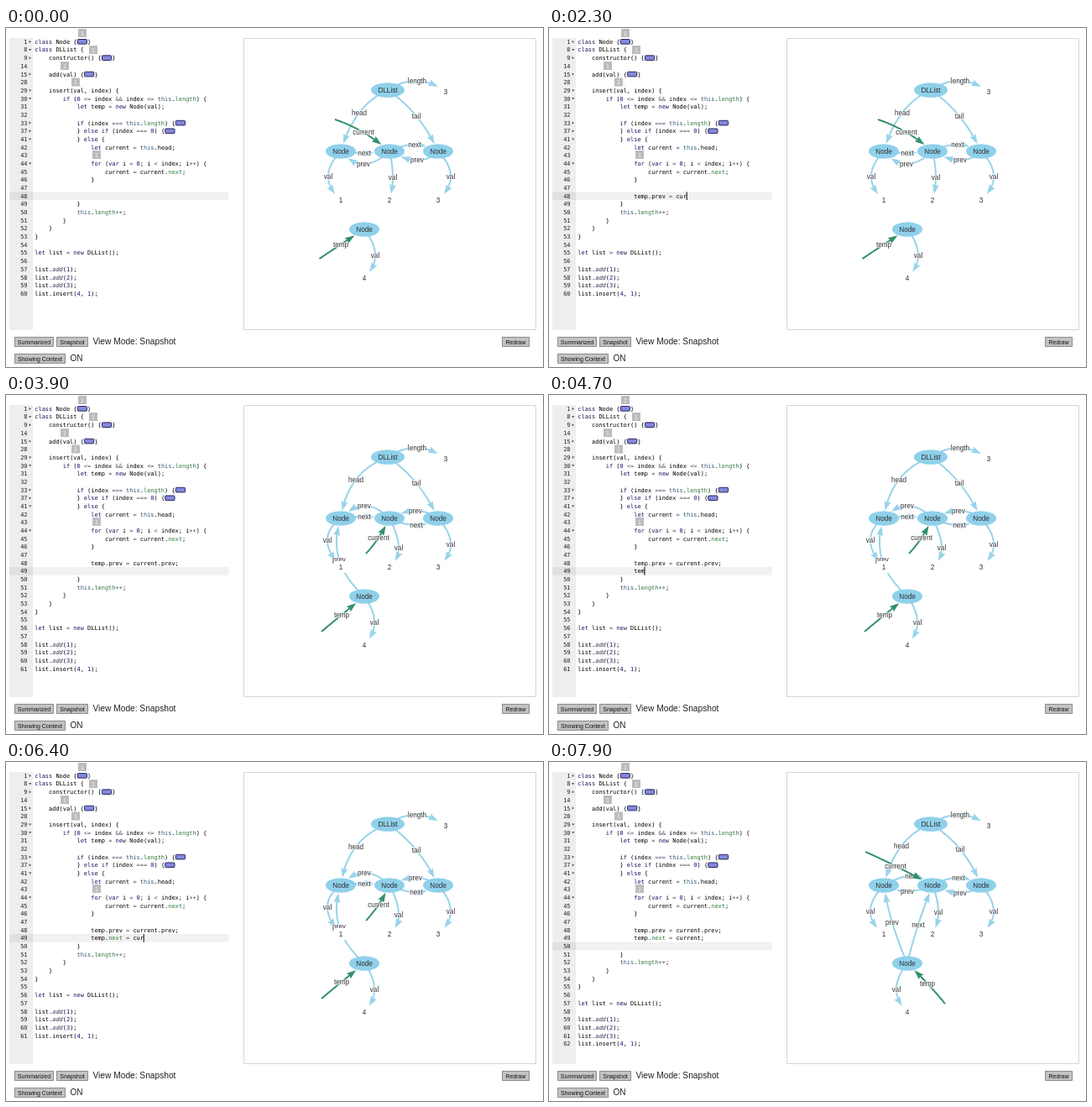
Animation, 640 px wide and 404 px high, one loop 8000 ms. Source, as an HTML page with a canvas:

```html
<!DOCTYPE html>
<html lang="en">
<head>
<meta charset="utf-8">
<title>Linked list editor</title>
<style>
html, body { margin: 0; width: 100%; height: 100%; overflow: hidden; background: #fff; }
canvas { display: block; width: 640px; height: 404px; }
</style>
</head>
<body>
<canvas id="stage"></canvas>
<script>
const LOOP = 8000, W = 640, H = 404;
const canvas = document.getElementById('stage');
const scale = Math.max(1, window.devicePixelRatio || 1);
canvas.width = W * scale;
canvas.height = H * scale;
const ctx = canvas.getContext('2d');

const MONO = '6.95px "DejaVu Sans Mono", monospace';
const SANS = '"Liberation Sans", Arial, sans-serif';
const CHAR = 4.183, ROW = 9.68, LEFT = 34.3, TOP = 16.3;
const SKY = '#8fd0ea', EDGE = '#98d3ea', GREEN = '#32906a';

// Each row: line number, gutter marker, code ("@" is a folded block).
const head = [
  [1, '>', 'class Node {@}'],
  [8, 'v', 'class DLList {'],
  [9, '>', '    constructor() {@}'],
  [14, '', ''],
  [15, '>', '    add(val) {@}'],
  [28, '', ''],
  [29, 'v', '    insert(val, index) {'],
  [30, 'v', '        if (0 <= index && index <= this.length) {'],
  [31, '', '            let temp = new Node(val);'],
  [32, '', ''],
  [33, '>', '            if (index === this.length) {@'],
  [37, '>', '            } else if (index === 0) {@'],
  [41, 'v', '            } else {'],
  [42, '', '                let current = this.head;'],
  [43, '', ''],
  [44, 'v', '                for (var i = 0; i < index; i++) {'],
  [45, '', '                    current = current.next;'],
  [46, '', '                }'],
  [47, '', '']
];
const tail = [
  '            }', '            this.length++;', '        }', '    }', '}', '',
  'let list = new DLList();', '',
  'list.add(1);', 'list.add(2);', 'list.add(3);', 'list.insert(4, 1);'
];
const badges = [[91, 6], [104, 26], [70, 45], [83, 64.5], [108, 151]];

// Typed lines: text, [time, characters] keys, time of the Enter key.
const typed = [
  { text: 'temp.prev = current.prev;', keys: [[450, 0], [1440, 9], [2250, 15], [3050, 22], [3400, 25]], enter: 3900 },
  { text: 'temp.next = current;', keys: [[4270, 0], [4640, 3], [6340, 15], [6950, 20]], enter: 7150 }
];

const nodes = {
  D: [455, 74, 'DLList', 20], A: [399, 147, 'Node', 18], B: [457, 147, 'Node', 18],
  C: [515, 147, 'Node', 18], T: [427, 240, 'Node', 18],
  len: [524, 76, '3'], v1: [399, 205, '1'], v2: [457, 205, '2'], v3: [515, 205, '3'], v4: [427, 298, '4']
};

// Edge: from, to, label, label position. Pointer: start, node, label, label position.
const scenes = [
  {
    at: 0,
    edges: `D len length 490 63;D A head 421 101;D C tail 489 105;A B next 427 149;B A prev 426 162;
      B C next 487 139;C B prev 490 157.5;A v1 val 384 177;B v2 val 461 178;C v3 val 530 177;T v4 val 440 271`,
    pointers: [[392, 109, 'B', 'current', 426, 124.5], [373.5, 275, 'T', 'temp', 399, 258]]
  },
  {
    at: 3900,
    edges: `D len length 490 63;D A head 417 101;D C tail 489 105;B A prev 427 132;A B next 427 145;
      C B prev 488 138;B C next 489 155;A v1 val 383 173;B v2 val 468 182;C v3 val 530 178;
      T A prev 397 196;T v4 val 439 271`,
    pointers: [[429, 189, 'B', 'current', 444, 170], [376, 282, 'T', 'temp', 400, 262]]
  },
  {
    at: 7180,
    edges: `D len length 490 63;D A head 420 100;D C tail 490 104;A B next 432 136;B A prev 427 154;
      B C next 488 138;C B prev 490 156;A v1 val 383 178;B v2 val 464 179;C v3 val 530 178;
      T A prev 409 191;T B next 440 194;T v4 val 414 271`,
    pointers: [[377, 107, 'B', 'current', 413, 124], [472, 288, 'T', 'temp', 451, 264]]
  }
];
for (const s of scenes) {
  s.edges = s.edges.split(';').map(e => {
    const [from, to, name, x, y] = e.trim().split(/\s+/);
    return { from, to, name, x: +x, y: +y };
  });
}

function text(str, x, y, color, font, align = 'left') {
  ctx.font = font;
  ctx.textAlign = align;
  ctx.textBaseline = 'alphabetic';
  ctx.fillStyle = color;
  ctx.fillText(str, x, y);
}

function box(x, y, w, h, fill, stroke) {
  ctx.fillStyle = fill;
  ctx.fillRect(x, y, w, h);
  if (!stroke) return;
  ctx.strokeStyle = stroke;
  ctx.lineWidth = 1;
  ctx.strokeRect(x + 0.5, y + 0.5, w - 1, h - 1);
}

function tokenColor(tok) {
  if (/^(class|let|var|new|if|else|for)$/.test(tok)) return '#14145c';
  if (/^(length|next)$/.test(tok)) return '#2c7a3a';
  if (tok === 'this') return '#2c5a74';
  if (/^\d+$/.test(tok)) return '#14147c';
  if (/^[=<&+]+$/.test(tok)) return '#485060';
  return '#000';
}

function pill(x, y) {
  ctx.beginPath();
  ctx.roundRect(x + 0.7, y - 2.8, 11.2, 5.6, 1);
  ctx.fillStyle = '#8488dc';
  ctx.fill();
  ctx.strokeStyle = '#26265c';
  ctx.lineWidth = 1;
  ctx.stroke();
}

function codeLine(str, y) {
  let x = LEFT, last = '';
  for (const tok of str.match(/\s+|\w+|[=<&+]+|./g) || []) {
    if (tok === '@') {
      pill(x, y);
      x += 3 * CHAR;
    } else {
      const call = last === '.' && tok === 'add';
      if (call) text(tok, x, y + 2.5, '#26324e', 'italic ' + MONO);
      else if (tok.trim()) text(tok, x, y + 2.5, tokenColor(tok), MONO);
      x += tok.length * CHAR;
    }
    last = tok;
  }
}

function marker(kind, y) {
  ctx.fillStyle = '#555';
  ctx.beginPath();
  if (kind === '>') {
    ctx.moveTo(27.6, y - 1.6); ctx.lineTo(30, y); ctx.lineTo(27.6, y + 1.6);
  } else {
    ctx.moveTo(27, y - 1); ctx.lineTo(30.4, y - 1); ctx.lineTo(28.7, y + 1.3);
  }
  ctx.fill();
}

function countAt(keys, t) {
  if (t < keys[0][0]) return 0;
  for (let i = 1; i < keys.length; i++) {
    const [t0, n0] = keys[i - 1], [t1, n1] = keys[i];
    if (t < t1) return Math.floor(n0 + (n1 - n0) * (t - t0) / (t1 - t0));
  }
  return keys[keys.length - 1][1];
}

function caretOn(t, line) {
  if (t < 300) return false;
  const start = line ? line.keys[0][0] : typed[1].enter;
  const end = line ? line.keys[line.keys.length - 1][0] : start;
  if (t >= start && t <= end) return true;
  const since = t > end ? t - end : t;
  return since % 1000 < 500;
}

function editor(t) {
  const done = typed.filter(l => t >= l.enter).length;
  const line = typed[done];
  const count = line ? countAt(line.keys, t) : 0;
  const pad = ' '.repeat(16);
  const rows = head.slice();
  let n = 48;
  for (let i = 0; i < done; i++) rows.push([n++, '', pad + typed[i].text]);
  const active = rows.length;
  rows.push([n++, '', pad + (line ? line.text.slice(0, count) : '')]);
  for (const str of tail) rows.push([n++, '', str]);

  const ay = TOP + active * ROW - 4.9;
  box(4, 12, 28, 348, '#eeeeee');
  box(4, ay, 28, ROW, '#e0e0e0');
  box(32, ay, 233.5, ROW, '#f1f1f1');
  rows.forEach(([num, mark, str], i) => {
    const y = TOP + i * ROW;
    text(num, 25.5, y + 2.5, '#222', MONO, 'right');
    if (mark) marker(mark, y);
    codeLine(str, y);
  });
  if (caretOn(t, line)) box(LEFT + (16 + count) * CHAR - 0.3, ay, 1, ROW, '#000');

  for (const [x, y] of badges) {
    box(x - 5, y - 5, 10, 10, '#bcbcbc');
    text('1', x, y + 2.5, '#f4f4f4', '7px ' + SANS, 'center');
  }
}

const mix = (a, b, c, t) => (1 - t) * (1 - t) * a + 2 * t * (1 - t) * b + t * t * c;

function inside(node, x, y) {
  const dx = x - node[0], dy = y - node[1];
  if (node[3]) return (dx / (node[3] + 0.5)) ** 2 + (dy / 9) ** 2 < 1;
  return Math.abs(dx) < 9 && Math.abs(dy) < 7;
}

// Curve from (x0, y0) to a node, passing through (mx, my) halfway.
function arrow(x0, y0, mx, my, node, color) {
  const cx = 2 * mx - (x0 + node[0]) / 2, cy = 2 * my - (y0 + node[1]) / 2;
  const at = t => [mix(x0, cx, node[0], t), mix(y0, cy, node[1], t)];
  let end = 1;
  while (end > 0.3 && inside(node, ...at(end))) end -= 0.005;
  const [x, y] = at(end), [bx, by] = at(end - 0.1);
  ctx.strokeStyle = ctx.fillStyle = color;
  ctx.lineWidth = 2;
  ctx.beginPath();
  ctx.moveTo(x0, y0);
  for (let t = 0.02; t < end - 0.06; t += 0.02) ctx.lineTo(...at(t));
  const a = Math.atan2(y - by, x - bx);
  ctx.lineTo(x - 8 * Math.cos(a), y - 8 * Math.sin(a));
  ctx.stroke();
  ctx.save();
  ctx.translate(x, y);
  ctx.rotate(a);
  ctx.beginPath();
  ctx.moveTo(0, 0);
  ctx.lineTo(-11.5, 4);
  ctx.lineTo(-10, 0);
  ctx.lineTo(-11.5, -4);
  ctx.fill();
  ctx.restore();
}

function label(str, x, y) {
  ctx.font = '8.2px ' + SANS;
  ctx.textAlign = 'center';
  ctx.lineJoin = 'round';
  ctx.strokeStyle = '#fff';
  ctx.lineWidth = 1.4;
  ctx.strokeText(str, x, y + 2.8);
  text(str, x, y + 2.8, '#343434', ctx.font, 'center');
}

function graph(t) {
  box(283, 12, 349, 348, '#fff', '#d6d6d6');
  const scene = scenes.filter(s => t >= s.at).pop();
  for (const e of scene.edges) {
    const [x, y] = nodes[e.from];
    arrow(x, y, e.x, e.y, nodes[e.to], EDGE);
    label(e.name, e.x, e.y);
  }
  for (const [x, y, to, name, lx, ly] of scene.pointers) {
    arrow(x, y, lx, ly, nodes[to], GREEN);
    label(name, lx, ly);
  }
  for (const [x, y, name, rx] of Object.values(nodes)) {
    if (rx) {
      ctx.fillStyle = SKY;
      ctx.beginPath();
      ctx.ellipse(x, y, rx, 8.7, 0, 0, 7);
      ctx.fill();
    } else {
      box(x - 8, y - 7, 16, 14, '#fff');
    }
    text(name, x, y + 2.8, '#303030', '8.2px ' + SANS, 'center');
  }
}

function button(str, x, y, w) {
  box(x, y, w, 12, '#c2c2c2', '#8c8c8c');
  text(str, x + w / 2, y + 8.5, '#111', '7px ' + SANS, 'center');
}

function controls() {
  button('Summarized', 10, 368, 47);
  button('Snapshot', 60, 368, 38);
  button('Showing Context', 10, 388, 61);
  button('Redraw', 591, 368, 33);
  text('View Mode: Snapshot', 103.5, 376.8, '#222', '10.2px ' + SANS);
  text('ON', 76.5, 396.5, '#222', '10px ' + SANS);
}

function draw(now) {
  const t = now % LOOP;
  ctx.setTransform(scale, 0, 0, scale, 0, 0);
  box(0, 0, W, H, '#fff');
  editor(t);
  graph(t);
  controls();
  requestAnimationFrame(frame);
}

let start = null;
function frame(now) {
  if (start === null) start = now;
  draw(Math.max(0, now - start));
}
requestAnimationFrame(frame);
</script>
</body>
</html>
```
